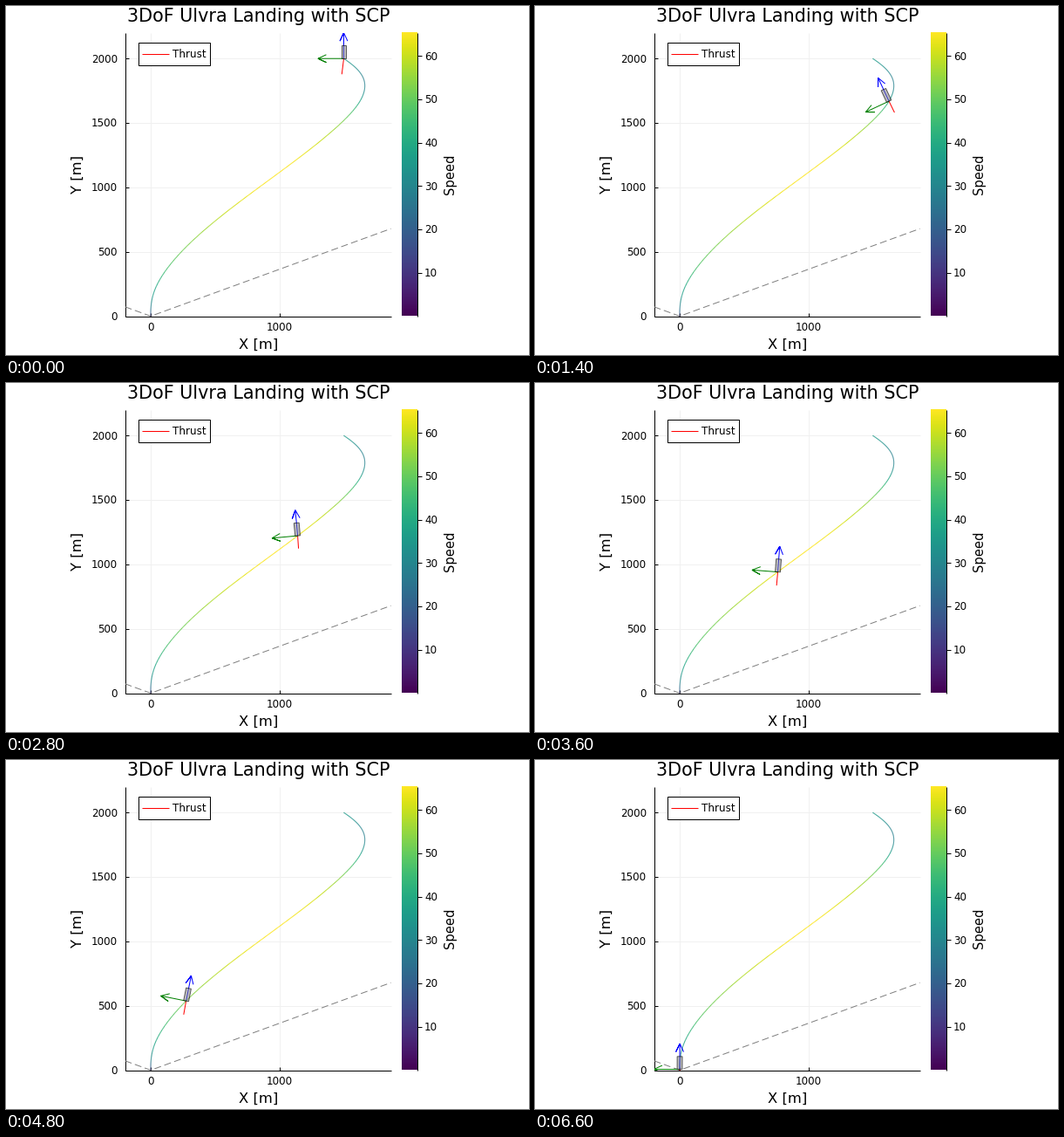
These frames come from a looping animation (600 by 400 pixels, 6670 ms). A matplotlib script:

```python
import numpy as np
import matplotlib.pyplot as plt
from matplotlib.animation import FuncAnimation
from matplotlib.collections import LineCollection
from matplotlib.patches import Polygon, Rectangle

W, H, DPI = 600, 400, 100
FRAMES, LOOP = 100, 6670
PX = 72 / DPI                      # one pixel in points
LEFT, RIGHT, TOP, BOTTOM = 136.5, 441.5, 30.7, 355.5
SCALE = (BOTTOM - TOP) / 2200      # pixels per metre
XMAX = -200 + (RIGHT - LEFT) / SCALE
TOP_SPEED = 65.35

plt.rcParams["font.family"] = "DejaVu Sans"


def spline(knots, values, start=0.0, end=0.0):
    """Clamped cubic spline, returned as a function of the frame."""
    t, v = np.array(knots, float), np.array(values, float)
    n, h = len(t), np.diff(t)
    d = np.diff(v) / h
    a, b = np.eye(n), np.zeros(n)
    b[0], b[-1] = start, end
    for i in range(1, n - 1):
        p, q = 1 / h[i - 1], 1 / h[i]
        a[i, i - 1:i + 2] = p, 2 * (p + q), q
        b[i] = 3 * (d[i - 1] * p + d[i] * q)
    m = np.linalg.solve(a, b)

    def curve(s):
        s = np.asarray(s, float)
        i = np.clip(np.searchsorted(t, s, side="right") - 1, 0, n - 2)
        u = (s - t[i]) / h[i]
        return ((1 + 2 * u) * (1 - u) ** 2 * v[i] + u * (1 - u) ** 2 * h[i] * m[i]
                + u * u * (3 - 2 * u) * v[i + 1] + u * u * (u - 1) * h[i] * m[i + 1])
    return curve


KNOTS = [0, 12, 21, 30, 54, 72, 87, 99]
pos_x = spline(KNOTS, [1500, 1657, 1626, 1454, 731, 253, 24, 0], 18, 0)
pos_y = spline(KNOTS, [2000, 1834, 1669, 1476, 918, 515, 183, 0], -12, -5)
tilt = spline(KNOTS, [0, 27.7, 25, 16.2, -4.9, -12, -16.3, 0])
gimbal = spline(KNOTS, [-7, 4, 1, -1, -0.5, 1, -1, 4])
thrust = spline(KNOTS, [123, 101, 98, 97, 106, 107, 104, 125])

fig = plt.figure(figsize=(W / DPI, H / DPI), dpi=DPI, facecolor="white")

# Pixel-space layer for axes, labels and colour bar
page = fig.add_axes([0, 0, 1, 1])
page.set_xlim(0, W)
page.set_ylim(H, 0)
page.axis("off")


def rule(x0, y0, x1, y1, color="black", z=2):
    page.plot([x0, x1], [y0, y1], color=color, lw=PX, zorder=z,
              solid_capstyle="butt")


def label(x, y, text, size, ha="center", va="baseline", rotation=0):
    page.text(x, y, text, fontsize=size * PX, ha=ha, va=va,
              rotation=rotation, rotation_mode="anchor")


def to_px(x, y):
    return LEFT + (x + 200) * SCALE, BOTTOM - y * SCALE


for gx in (0, 1000):
    x, _ = to_px(gx, 0)
    rule(x, TOP, x, BOTTOM, "#f0f0f0", 1)
    rule(x, BOTTOM - 4, x, BOTTOM)
    label(x, 371.5, str(gx), 11.9)
for gy in range(0, 2001, 500):
    _, y = to_px(0, gy)
    if gy:
        rule(LEFT, y, RIGHT, y, "#f0f0f0", 1)
    rule(LEFT, y, LEFT + 4, y)
    label(128, y + 4.4, str(gy), 11.9, ha="right")
rule(LEFT, TOP, LEFT, BOTTOM)
rule(LEFT, BOTTOM, RIGHT, BOTTOM)

label(289.3, 18.5, "3DoF Ulvra Landing with SCP", 20.8)
label(290, 392.3, "X [m]", 16.35)
label(87, 193, "Y [m]", 16.35, rotation=90)
label(514.5, 193, "Speed", 14.8, rotation=90)

page.imshow(np.linspace(1, 0, 256)[:, None], cmap="viridis", aspect="auto",
            extent=(453.5, 471.5, BOTTOM, TOP), zorder=1)
page.set_xlim(0, W)
page.set_ylim(H, 0)
rule(471.5, TOP, 471.5, BOTTOM)
for s in range(10, 61, 10):
    y = BOTTOM - s / TOP_SPEED * (BOTTOM - TOP)
    rule(471.5, y, 477, y)
    label(480, y + 4.4, str(s), 11.9, ha="left")

page.add_patch(Rectangle((151.5, 41.5), 82.5, 26, fc="white", ec="black",
                         lw=PX, zorder=3))
rule(156, 54.5, 186.5, 54.5, "red", 4)
label(191, 58.8, "Thrust", 11.9, ha="left")

# Data-space layer
ax = fig.add_axes([LEFT / W, 1 - BOTTOM / H, (RIGHT - LEFT) / W, (BOTTOM - TOP) / H])
ax.set_xlim(-200, XMAX)
ax.set_ylim(0, 2200)
ax.axis("off")

slope = np.tan(np.radians(20))
ax.plot([-200, 0, XMAX], [200 * slope, 0, XMAX * slope], color="gray",
        lw=PX, ls=(0, (8, 4)), zorder=1)

ts = np.linspace(0, FRAMES - 1, 397)
path = np.column_stack([pos_x(ts), pos_y(ts)])
speed = np.hypot(*np.gradient(path, ts, axis=0).T)
track = LineCollection(np.stack([path[:-1], path[1:]], axis=1), cmap="viridis",
                       lw=PX, zorder=2)
track.set_array(speed[:-1])
track.set_clim(0, speed.max())
ax.add_collection(track)


def stroke(color, z):
    return ax.plot([], [], color=color, lw=PX, zorder=z,
                   solid_joinstyle="miter", solid_capstyle="butt")[0]


flame, up_arrow, side_arrow = stroke("red", 3), stroke("blue", 4), stroke("green", 4)
body = Polygon(np.zeros((4, 2)), closed=True, fc=(0.5, 0.5, 0.5, 0.5),
               ec=(0, 0, 0, 0.6), lw=PX, zorder=5)
ax.add_patch(body)


def set_arrow(line, base, d):
    """Open-headed arrow 200 m long from base along unit vector d."""
    n = np.array([-d[1], d[0]])
    tip = base + 200 * d
    back = tip - 64 * d
    pts = np.array([base, tip, back + 30 * n, tip, back - 30 * n])
    line.set_data(pts[:, 0], pts[:, 1])


def update(k):
    base = np.array([pos_x(k), pos_y(k)])
    a = np.radians(tilt(k))
    up = np.array([-np.sin(a), np.cos(a)])
    side = np.array([-up[1], up[0]])
    set_arrow(up_arrow, base, up)
    set_arrow(side_arrow, base, side)
    body.set_xy([base + 20 * side, base + 20 * side + 100 * up,
                 base - 20 * side + 100 * up, base - 20 * side])
    f = a + np.radians(gimbal(k))
    end = base + thrust(k) * np.array([np.sin(f), -np.cos(f)])
    flame.set_data([base[0], end[0]], [base[1], end[1]])
    return flame, up_arrow, side_arrow, body


anim = FuncAnimation(fig, update, frames=FRAMES, interval=LOOP / FRAMES, repeat=True)
plt.show()
```
